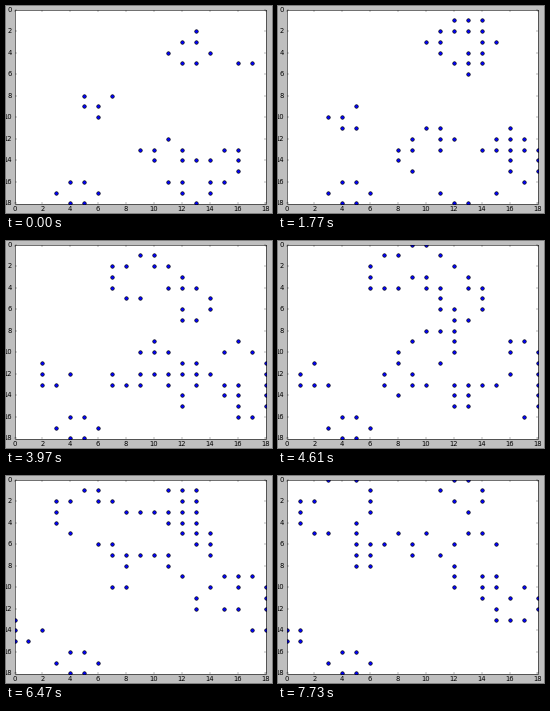
A matplotlib script for the animation above (8 s loop, 266x207 px).

```python
import numpy as np
import matplotlib.pyplot as plt
from matplotlib.animation import FuncAnimation

WIDTH, HEIGHT, DPI = 266, 207, 40
LEFT, RIGHT, TOP, BOTTOM = 8.5, 259.5, 3.5, 197.5
SIZE = 19
INTERVAL, LOOP = 20, 8000
FIRST_STEP, STEP = 140, 316.25


def draw_path(grid, *corners):
    """Bring to life every cell on straight or diagonal runs between corners."""
    for (x0, y0), (x1, y1) in zip(corners, corners[1:]):
        count = max(abs(x1 - x0), abs(y1 - y0)) + 1
        grid[np.linspace(y0, y1, count).astype(int),
             np.linspace(x0, x1, count).astype(int)] = 1


def draw_beehive(grid, cx, cy):
    y, x = np.indices(grid.shape)
    grid[abs(x - cx) + abs(y - cy) == 1.5] = 1


def starting_grid():
    grid = np.zeros((SIZE, SIZE), int)
    draw_beehive(grid, 4.5, 17)
    draw_beehive(grid, 12.5, 4)
    draw_path(grid, (13, 2), (13, 3))
    draw_path(grid, (16, 5), (17, 5))
    # Glider
    draw_path(grid, (5, 8), (5, 9), (6, 10), (6, 9), (7, 8))
    # Lower cluster: wave, hook and wedge
    draw_path(grid, (10, 14), (9, 13), (10, 13), (11, 12), (12, 13), (12, 14), (14, 14))
    draw_path(grid, (15, 13), (16, 13), (16, 15))
    for side in (-1, 1):
        draw_path(grid, (13 + 2 * side, 16), (13 + side, 16), (13 + side, 17), (13, 18))
    return grid


def next_generation(grid):
    """Conway's rule on a board with dead surroundings."""
    padded = np.pad(grid, 1)
    around = sum(padded[dy:dy + SIZE, dx:dx + SIZE]
                 for dy in range(3) for dx in range(3)) - grid
    return ((around == 3) | ((grid == 1) & (around == 2))).astype(int)


def generation_at(time):
    return int((time - FIRST_STEP) // STEP) + 1


generations = [starting_grid()]
for _ in range(generation_at(LOOP)):
    generations.append(next_generation(generations[-1]))

plt.rcParams.update({"font.family": "DejaVu Sans", "savefig.dpi": "figure"})
fig = plt.figure(figsize=(WIDTH / DPI, HEIGHT / DPI), dpi=DPI, facecolor="0.75")
ax = fig.add_axes([LEFT / WIDTH, 1 - BOTTOM / HEIGHT,
                   (RIGHT - LEFT) / WIDTH, (BOTTOM - TOP) / HEIGHT])
ax.set_xlim(0, SIZE - 1)
ax.set_ylim(SIZE - 1, 0)
ax.set_xticks(range(0, SIZE, 2))
ax.set_yticks(range(0, SIZE, 2))
ax.tick_params(direction="in", length=4, width=0.5, pad=4, labelsize=12.1,
               top=True, right=True)
for label in ax.get_yticklabels():
    label.set_va("center")
for spine in ax.spines.values():
    spine.set_linewidth(1)

cells, = ax.plot([], [], "o", color="blue", markersize=6.3,
                 markeredgecolor="black", markeredgewidth=1.1)
cells.set_snap(False)


def update(frame):
    now = (frame + 0.5) * INTERVAL
    rows, columns = np.nonzero(generations[max(0, generation_at(now))])
    cells.set_data(columns, rows)
    return cells,


anim = FuncAnimation(fig, update, frames=LOOP // INTERVAL, interval=INTERVAL,
                     repeat=True, repeat_delay=0)
plt.show()
```
